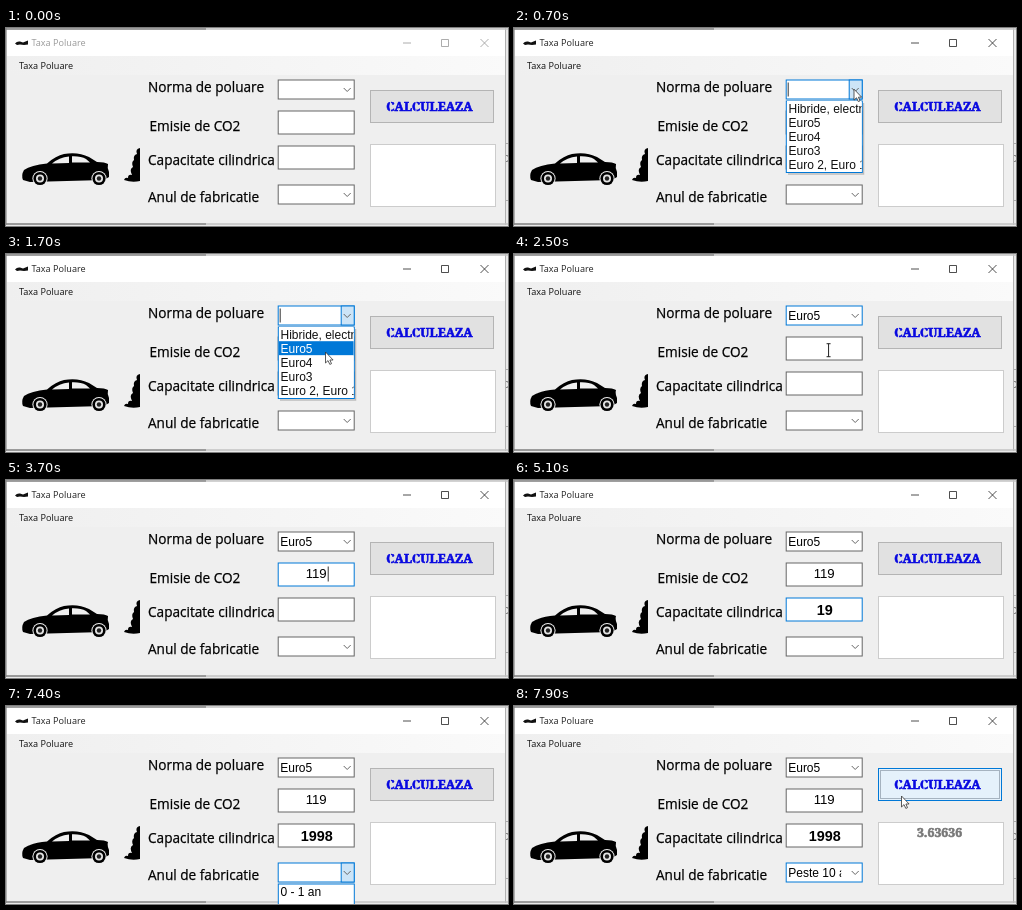
These frames come from a looping animation (502x198 px, 8 s). An HTML page:

```html
<!DOCTYPE html>
<html lang="ro">
<head>
<meta charset="utf-8">
<title>Taxa Poluare</title>
<style>
html, body { margin: 0; width: 502px; height: 198px; overflow: hidden; background: #efefef; }
svg { display: block; }
text { white-space: pre; }
.ui { font: 9.1px "Open Sans", "Noto Sans", sans-serif; }
.label { font: 13.6px "Open Sans", "Noto Sans", sans-serif; stroke: #000; stroke-width: .25; }
.item { font: 12px "Liberation Sans", Arial, sans-serif; }
.num { font: 13.2px "Liberation Sans", Arial, sans-serif; text-anchor: middle; }
.bold { font-size: 14.4px; font-weight: bold; }
.stencil { font: 900 12.4px "Noto Serif", serif; text-anchor: middle; stroke-width: .6; }
.field { fill: #fff; stroke: #666; }
.arrow { fill: none; stroke: #666; }
.hide { display: none; }
</style>
</head>
<body>
<svg width="502" height="198" viewBox="0 0 502 198">
  <defs>
    <linearGradient id="strip"><stop stop-color="#efefef"/><stop offset="1" stop-color="#fafafa"/></linearGradient>
    <clipPath id="picture"><rect x="14" y="115" width="120" height="45"/></clipPath>
    <clipPath id="listClip"><rect x="273" y="73" width="74.500" height="72"/></clipPath>
    <clipPath id="yearClip"><rect x="273" y="158" width="54.500" height="18"/></clipPath>
  </defs>

  <!-- desktop edge and window -->
  <rect width="502" height="198" fill="#e9e9e9"/>
  <path d="M500 115.500h2M500 172.500h2" stroke="#aaa"/>
  <text x="497" y="134" class="ui" fill="#555">D</text>
  <rect x="1" y="1" width="498.500" height="195" fill="#efefef"/>
  <rect x="1" y="1" width="498.500" height="27" fill="#fff"/>
  <rect x="1" y="28" width="498.500" height="19" fill="url(#strip)"/>
  <path d="M.5 0V197M499.500 0V197" stroke="#b0b0b0"/>
  <path d="M200 1H502M200 196H502" stroke="#c4c4c4" stroke-width="1.500"/>
  <path d="M0 1H200M0 196H200" stroke="#808080" stroke-width="1.500"/>

  <path d="M9 15.500q2-2.500 5-2l3 1 5-2v4l-4 .5-4-.5-3 .5z" fill="#111"/>
  <g id="chrome" fill="#999" stroke="#999" stroke-width=".8">
    <text x="25.500" y="17.500" class="ui" stroke="none">Taxa Poluare</text>
    <path d="M397 15h8M435.500 11.500h7v7h-7zM474.500 11l8 8M482.500 11l-8 8" fill="none"/>
  </g>
  <text x="13" y="40.500" class="ui" fill="#111">Taxa Poluare</text>

  <!-- car and exhaust -->
  <g clip-path="url(#picture)">
    <path d="M17 152Q15 147 18 142Q25 137 41 135.500Q50 127.500 58 126Q72 123.500 83 129L91 134Q99 134 102 136Q101 140 103 144V149L98 152L24 154Z"/>
    <path d="M46 135.500Q53 129.500 63 128.500V135ZM66 128.300Q75 128 80 131L84 134.500H66Z" fill="#efefef"/>
    <g id="wheels"></g>
    <path d="M118 152Q119 149 122 150Q122 146 126 147Q123 141 127 139Q125 134 128 132Q127 127 131 126Q129 121 134 120V153Q126 155 118 152Z"/>
  </g>

  <g class="label">
    <text x="142" y="64">Norma de poluare</text>
    <text x="143.500" y="103">Emisie de CO2</text>
    <text x="142" y="137">Capacitate cilindrica</text>
    <text x="142" y="174.300">Anul de fabricatie</text>
  </g>

  <!-- fields -->
  <g transform="translate(-.3 -.5)">
    <rect id="norm" class="field" x="272.500" y="52.500" width="76" height="19"/>
    <rect id="normBtn" x="335.500" y="52.500" width="13" height="19" fill="#cce4f7" stroke="#0078d7"/>
    <path class="arrow" d="M338 60.500l3.500 3.500 3.500-3.500"/>
    <text id="normText" class="item" x="274.500" y="66.500"></text>
    <rect id="co2" class="field" x="272.500" y="83.500" width="76" height="23"/>
    <text id="co2Text" class="num" x="310.500" y="98.500"></text>
    <rect id="cap" class="field" x="272.500" y="118.500" width="76" height="23"/>
    <text id="capText" class="num bold" x="311" y="135.800"></text>
    <rect id="year" class="field" x="272.500" y="157.500" width="76" height="19"/>
    <rect id="yearBtn" x="335.500" y="157.500" width="13" height="19" fill="#cce4f7" stroke="#0078d7"/>
    <path class="arrow" d="M338 165.500l3.500 3.500 3.500-3.500"/>
    <text id="yearText" class="item" x="274.500" y="171.300" clip-path="url(#yearClip)"></text>
    <path id="caret" stroke="#333"/>
  </g>

  <!-- button and result -->
  <rect id="calc" x="364.500" y="62.500" width="123" height="32"/>
  <rect id="ring" x="366.500" y="64.500" width="119" height="28" fill="none" stroke="#456" stroke-width=".8" stroke-dasharray="1 1"/>
  <text class="stencil" x="423.500" y="83.300" fill="#0808e0" stroke="#0808e0">CALCULEAZA</text>
  <path id="slits" d="M384.500 73v11M410 73v11M419.500 80v5" stroke-width=".9"/>
  <rect x="364.500" y="116.500" width="125" height="62" fill="#fff" stroke="#ccc"/>
  <text id="result" class="stencil" x="425.500" y="131" fill="#777" stroke="#777"></text>

  <!-- lists -->
  <g id="normList">
    <path d="M274 146H349.500V75" fill="none" stroke="#999" stroke-width="1.500" opacity=".6"/>
    <rect x="272.300" y="73" width="76" height="71.500" fill="#fff" stroke="#0078d7"/>
    <g id="normRows" clip-path="url(#listClip)"></g>
  </g>
  <g id="yearList">
    <rect x="272.300" y="178" width="76" height="40" fill="#fff" stroke="#0078d7"/>
    <text class="item" x="274.500" y="190">0 - 1 an</text>
  </g>

  <path id="beam" d="M-2-6.500h4M0-6.500V6.500M-2 6.500h4" stroke="#222"/>
  <path id="pointer" d="M0 0V11L2.500 8.600 4.300 12.400 6 11.700 4.400 8H7.600Z" fill="#fff" stroke="#333" stroke-width=".8"/>
</svg>
<script>
const LOOP = 8000, STEP = 100, BLUE = "#0078d7";
const el = id => document.getElementById(id);
const show = (id, on) => el(id).classList.toggle("hide", !on);
const set = (id, attrs) => {
  for (const [k, v] of Object.entries(attrs)) el(id).setAttribute(k, v);
};

const wheel = x => [[7.6, "#efefef"], [6.6, "#000"], [4, "#e4e4e4"], [2.2, "#222"]]
  .map(([r, fill]) => `<circle cx="${x}" cy="150.500" r="${r}" fill="${fill}"/>`).join("");
el("wheels").innerHTML = wheel(34) + wheel(93);

const ROW = 14.2, LIST_TOP = 73;
const options = ["Hibride, electrice", "Euro5", "Euro4", "Euro3", "Euro 2, Euro 1"];
el("normRows").innerHTML = options.map((name, i) => {
  const y = LIST_TOP + i * ROW;
  return `<rect x="273" y="${y}" width="75" height="${ROW}"/><text class="item" x="274.500" y="${y + 11.6}">${name}</text>`;
}).join("");
const rows = [...el("normRows").children];

// [time, value]: the latest entry holds
const focus = [[0, ""], [600, "norm"], [2700, "co2"], [4000, "cap"], [7000, "year"]];
const co2 = [[0, ""], [3100, "1"], [3300, "11"], [3500, "119"]];
const cap = [[0, ""], [4300, "1"], [4500, "19"], [5500, "199"], [5700, "1998"]];
const entryAt = (list, t) => list.filter(e => e[0] <= t).pop();

// [time, x, y] of the mouse
const path = [[200, 296, 104], [600, 340, 61], [1000, 340, 62], [1400, 324, 91], [1700, 319.5, 98],
  [2100, 319.5, 98], [2600, 314, 96], [6200, 314, 131], [6500, 320, 140], [6700, 324.5, 155],
  [6900, 341, 166], [7000, 341, 167], [7200, 322, 199], [7500, 320, 205], [7800, 387.5, 90], [8000, 387.5, 90]];
const mouseAt = t => {
  const i = Math.max(1, path.findIndex(p => p[0] >= t));
  const [t0, x0, y0] = path[i - 1], [t1, x1, y1] = path[i];
  const u = Math.max(0, (t - t0) / (t1 - t0)), e = u * u * (3 - 2 * u);
  return [x0 + (x1 - x0) * e, y0 + (y1 - y0) * e];
};

function draw(t) {
  const ink = t >= 100 ? "#222" : "#999";
  set("chrome", { fill: ink, stroke: ink });

  const [since, target] = entryAt(focus, t);
  const [co2Time, co2Value] = entryAt(co2, t);
  const [capTime, capValue] = entryAt(cap, t);
  el("co2Text").textContent = co2Value;
  el("capText").textContent = capValue;
  el("normText").textContent = t >= 2000 ? "Euro5" : "";
  el("yearText").textContent = t >= 7500 ? "Peste 10 ani" : "";
  el("result").textContent = t >= 7900 ? "3.63636" : "";
  for (const id of ["norm", "co2", "cap", "year"])
    set(id, { style: target === id ? `stroke:${BLUE}` : "" });

  const normOpen = t >= 600 && t < 2000, yearOpen = t >= 7000 && t < 7500;
  show("normBtn", normOpen);
  show("normList", normOpen);
  show("yearBtn", yearOpen);
  show("yearList", yearOpen);

  const [x, y] = mouseAt(t);
  const hover = t >= 1000 && y > LIST_TOP ? Math.floor((y - LIST_TOP) / ROW) : -1;
  options.forEach((_, i) => {
    rows[2 * i].setAttribute("fill", i === hover ? BLUE : "#fff");
    rows[2 * i + 1].setAttribute("fill", i === hover ? "#fff" : "#111");
  });

  const half = text => text.length * 0.278;
  const carets = {
    norm: [274.5, 55, 69],
    co2: [311.5 + half(co2Value) * 13.2, 87, 102],
    cap: [312 + half(capValue) * 14.4, 122, 138]
  };
  const spot = carets[target];
  const lastKey = target === "co2" ? co2Time : target === "cap" ? capTime : since;
  const lit = (t - Math.max(since, lastKey)) % 1000 < 500;
  show("caret", spot && lit && !(target === "norm" && !normOpen));
  if (spot) set("caret", { d: `M${spot[0]} ${spot[1]}V${spot[2]}` });

  const over = t >= 7800, fill = over ? "#e5f1fb" : "#e1e1e1";
  set("calc", { fill, stroke: over ? BLUE : "#b4b4b4" });
  set("slits", { stroke: fill });
  show("ring", over);

  const visible = (t >= 200 && t < 3000) || t >= 6200;
  const inBox = !normOpen && ((y > 83 && y < 107) || (y > 118 && y < 142)) && x < 349;
  show("beam", visible && inBox);
  show("pointer", visible && !inBox);
  for (const id of ["beam", "pointer"]) set(id, { transform: `translate(${x} ${y})` });
}

function tick() {
  draw(Math.floor(performance.now() % LOOP / STEP) * STEP);
  requestAnimationFrame(tick);
}
tick();
</script>
</body>
</html>
```
